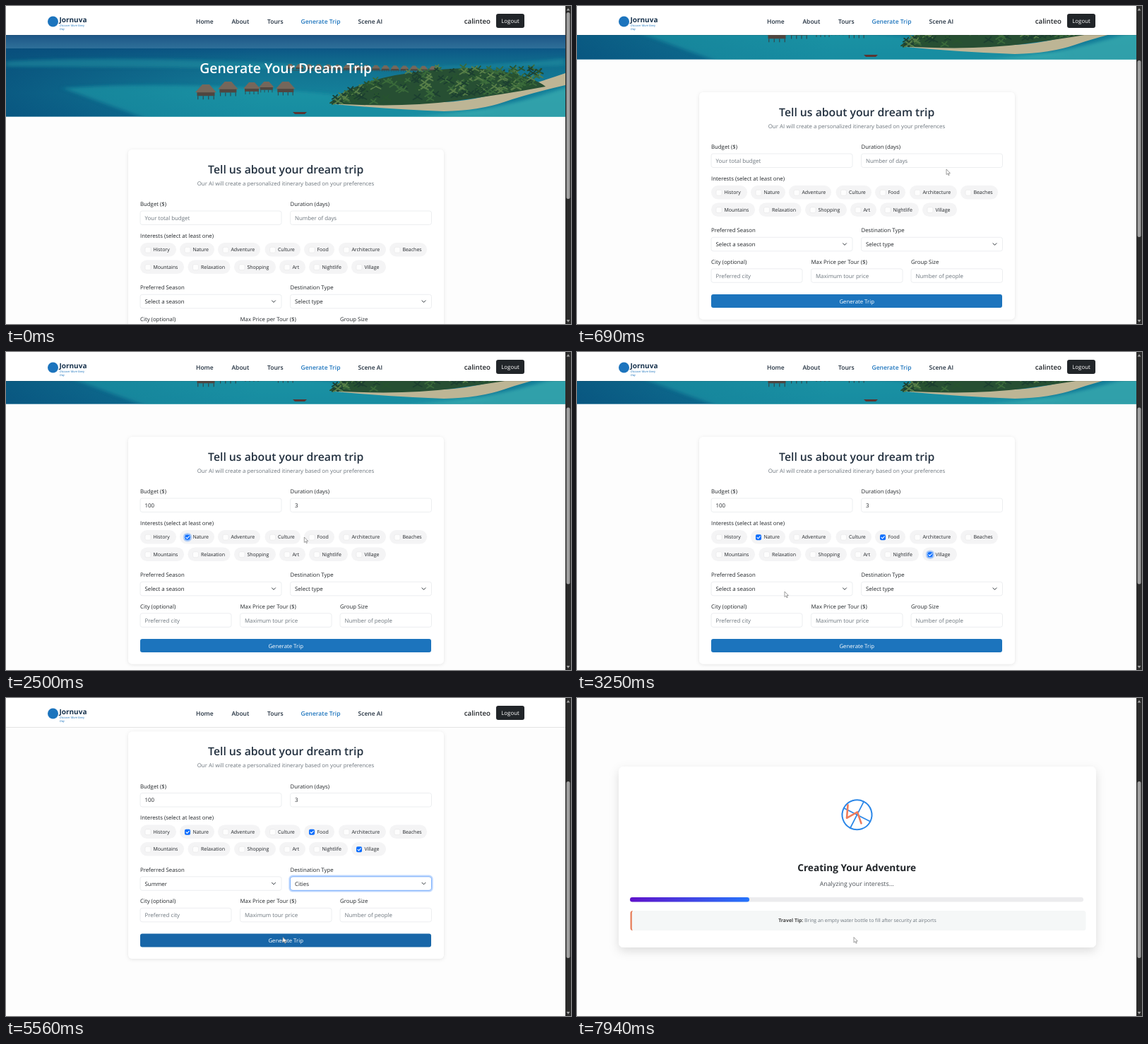
An HTML page for the animation above (8 s loop, 800 by 450 pixels).

```html
<!DOCTYPE html>
<html lang="en">
<head>
<meta charset="utf-8">
<title>Trip generator</title>
<style>
  html, body { margin: 0; width: 100%; height: 100%; overflow: hidden; background: #fdfdfd; }
  svg { display: block; width: 100vw; height: 100vh; }
  text { font-family: "Open Sans", "Noto Sans", sans-serif; text-rendering: geometricPrecision; white-space: pre; }
  .field { fill: #fff; stroke: #e7eaed; stroke-width: .8; }
  .line { fill: none; stroke-linecap: round; stroke-linejoin: round; }
</style>
</head>
<body>
<svg id="stage" viewBox="0 0 800 450">
  <defs>
    <linearGradient id="sky" x2="0" y2="1"><stop stop-color="#1d5686"/><stop offset="1" stop-color="#2f719a"/></linearGradient>
    <linearGradient id="sea" x2="0" y2="1">
      <stop stop-color="#0c5786"/><stop offset=".25" stop-color="#12708f"/>
      <stop offset=".65" stop-color="#14809a"/><stop offset="1" stop-color="#0f7495"/>
    </linearGradient>
    <linearGradient id="deep"><stop stop-color="#064a78" stop-opacity=".7"/><stop offset="1" stop-color="#064a78" stop-opacity="0"/></linearGradient>
    <linearGradient id="bar"><stop stop-color="#5f12cb"/><stop offset="1" stop-color="#2575fc"/></linearGradient>
    <filter id="blur"><feGaussianBlur stdDeviation="4 2"/></filter>
    <filter id="soft" x="-10%" y="-10%" width="120%" height="125%"><feDropShadow dx="0" dy="1" stdDeviation="2.5" flood-opacity=".1"/></filter>
    <filter id="lift" x="-10%" y="-10%" width="120%" height="130%"><feDropShadow dx="0" dy="5" stdDeviation="7" flood-opacity=".13"/></filter>
    <clipPath id="frame"><rect y="41" width="792" height="115.500"/></clipPath>
  </defs>
  <rect width="800" height="450" fill="#fdfdfd"/>
  <g id="site">
    <g id="page"></g>
    <g id="header"></g>
  </g>
  <g id="loading"></g>
  <g id="scrollbar">
    <rect x="792" width="8" height="450" fill="#2b2b2b"/>
    <path d="M796 3l2.4 3.4h-4.8zM796 447.500l2.400-3.400h-4.800z" fill="#a3a3a3"/>
    <rect id="thumb" x="793.500" width="5" rx="2.500" fill="#a0a0a0"/>
  </g>
  <path id="arrow" d="M0 0V7.600L1.800 6 3 8.700 4.200 8.200 3 5.600H5.400Z" fill="#fff" stroke="#777" stroke-width=".7"/>
  <path id="beam" class="line" d="M-1.500-4.500h3M0-4.500v9M-1.500 4.500h3" stroke="#333" stroke-width=".8"/>
</svg>
<script>
const LOOP = 8000;
const $ = id => document.getElementById(id);
const show = (id, on) => $(id).setAttribute("visibility", on ? "visible" : "hidden");
const move = (id, x, y) => $(id).setAttribute("transform", `translate(${x} ${y})`);
const INK = "#212529", NAVY = "#22303f", GREY = "#6c757d";

const label = (x, y, str, size, fill = INK, more = "") =>
  `<text x="${x}" y="${y}" font-size="${size}" fill="${fill}" ${more}>${str}</text>`;
const box = (x, y, w, h, r, fill, more = "") =>
  `<rect x="${x}" y="${y}" width="${w}" height="${h}" rx="${r}" fill="${fill}" ${more}/>`;
const MID = 'text-anchor="middle"', SEMI = 'font-weight="600"';

function hut(x, y, s) {
  return `<g transform="translate(${x} ${y}) scale(${s})">
    <path d="M2 8h20v5H2z" fill="#4f4640"/><path d="M0 9 8 0h8l8 9z" fill="#75675b"/>
    <path d="M3 13v4M9 13v4M15 13v4M21 13v4" stroke="#33484f"/></g>`;
}

// Palm crowns: short random fronds over the outline of the island.
function palms(count) {
  let seed = 7;
  const rnd = () => (seed = seed * 16807 % 2147483647) / 2147483647;
  return Array.from({ length: count }, () => {
    const u = rnd(), x = 466 + u * 290;
    const top = 128 - 44 * Math.sin(Math.PI * Math.min(.62, u * .95)), low = 137 - 24 * u * u;
    const y = top + rnd() * (low - top), r = 3 + rnd() * 4;
    return `<path d="M${x} ${y}l${-r} ${r * .6}M${x} ${y}l${r} ${r * .5}M${x} ${y}l${-r * .7} ${-r * .5}M${x} ${y}l${r * .6} ${-r * .7}"
      stroke="${["#1c3f30", "#27532f", "#3a6a3a", "#587f48"][Math.floor(rnd() * 4)]}" stroke-width="1.800"/>`;
  }).join("");
}

function hero() {
  const farHuts = Array.from({ length: 16 }, (_, i) => hut(396 + i * 13.500, 82 + i * .2, .52)).join("");
  return `<g clip-path="url(#frame)">${box(0, 41, 792, 20, 0, "url(#sky)")}${box(0, 60, 792, 97, 0, "url(#sea)")}
    ${box(0, 60, 360, 97, 0, "url(#deep)")}
    <g filter="url(#blur)">
      <path d="M0 78Q180 70 400 82T792 74V84Q560 92 380 89T0 86z" fill="#2396a6" opacity=".5"/>
      <path d="M80 116Q260 104 470 126T700 150L600 160H200z" fill="#20a0ab" opacity=".55"/>
      <path d="M560 158Q700 150 800 112V160z" fill="#37aab0" opacity=".8"/>
    </g>
    <path d="M395 91H620" stroke="#3f5358" stroke-width="1.200"/>${farHuts}
    <path d="M466 137Q560 138 620 136T792 95V112Q740 124 705 136T620 149Q540 146 466 139z" fill="#bdb595"/>
    <path d="M458 137Q480 118 515 107T595 92Q660 84 705 93T764 114Q700 126 630 135T458 138z" fill="#274f33"/>
    <g class="line">${palms(170)}</g>
    ${hut(268, 111, 1.250)}${hut(300, 107, 1.200)}${hut(336, 108, 1)}${hut(358, 107, .9)}${hut(382, 107, 1.150)}
    <path d="M406 150h20l-3 3h-14z" fill="#5a3532"/></g>
    ${label(396.2, 94.5, "Generate Your Dream Trip", 19.4, "#fff", MID + SEMI)}`;
}

const chips = [
  ["History", 190, 51, 0], ["Nature", 246, 49, 0, 2250], ["Adventure", 300, 60, 0], ["Culture", 366.5, 50.500, 0],
  ["Food", 422, 43, 0, 2600], ["Architecture", 471, 67, 0], ["Beaches", 543, 53, 0],
  ["Mountains", 190, 62, 1], ["Relaxation", 257.5, 60, 1], ["Shopping", 323, 59, 1], ["Art", 387, 37, 1],
  ["Nightlife", 429, 55, 1], ["Village", 489, 49, 1, 2950]
];
const chip = ([name, x, w, row, at]) => {
  const y = 335 + row * 24.5;
  const tick = at ? `<g id="${name}">${box(x + 7, y + 6.2, 8, 8, 2, "#0d6efd")}
    <path class="line" d="M${x + 9} ${y + 10.3}l1.500 1.500 2.800-3" stroke="#fff" stroke-width="1.100"/></g>` : "";
  return box(x, y, w, 19.500, 9.75, "#f4f4f5") +
    box(x + 7, y + 6.2, 8, 8, 2, "#fdfdfd", 'stroke="#e8e8ea" stroke-width=".7"') + tick +
    label(x + 18.4, y + 12.2, name, 7);
};

// A labelled input; the text element carries the id so that its value can change.
const field = (id, name, x, y, w, hint, select) =>
  label(x, y - 7, name, 7.8) + `<rect class="field" x="${x}" y="${y}" width="${w}" height="19.500" rx="3"/>` +
  label(x + 6.5, y + 12.9, hint, 7.9, select ? INK : GREY, `id="${id}"`) +
  (select ? `<path class="line" d="M${x + w - 13.500} ${y + 8.500}l2.500 2.600 2.500-2.600" stroke="#343a40"/>` : "");

$("page").innerHTML = hero() +
  box(173, 203, 447, 321.5, 6, "#fff", 'filter="url(#soft)"') +
  label(396.2, 236.600, "Tell us about your dream trip", 15.75, NAVY, MID + SEMI) +
  label(396, 253.8, "Our AI will create a personalized itinerary based on your preferences", 7.86, GREY, MID) +
  field("budget", "Budget ($)", 190, 290, 200, "Your total budget") +
  field("days", "Duration (days)", 402.5, 290, 200, "Number of days") +
  label(190, 327.5, "Interests (select at least one)", 7.85) + chips.map(chip).join("") +
  field("season", "Preferred Season", 190, 408.3, 200, "Select a season", true) +
  field("kind", "Destination Type", 402.5, 408.3, 200, "Select type", true) +
  field("city", "City (optional)", 190, 452.8, 129, "Preferred city") +
  field("price", "Max Price per Tour ($)", 331.5, 452.8, 129.5, "Maximum tour price") +
  field("group", "Group Size", 473, 452.8, 129.5, "Number of people") +
  box(190, 489, 412, 19, 3, "#1c74bd", 'id="submit"') +
  label(396.2, 501.5, "Generate Trip", 7.8, "#fff", MID) +
  `<rect id="ring" rx="3.500" fill="none" stroke="#86b7fe" stroke-width="1"/>
   <rect id="glow" rx="4.500" fill="none" stroke="#0d6efd" stroke-opacity=".25" stroke-width="2"/>
   <path id="spin" d="M589.200 298.500l2-2.600 2 2.600zM589.200 301.700l2 2.600 2-2.600z" fill="#777"/>
   <rect id="caret" y="295.500" width=".7" height="9" fill="#111"/>`;

const nav = [["Home", 269], ["About", 319.5], ["Tours", 370], ["Generate Trip", 417.5], ["Scene AI", 498.5]];
$("header").innerHTML = box(0, 41, 792, 1, 0, "#000", 'opacity=".1"') + box(0, 0, 792, 41, 0, "#fff") +
  `<circle cx="66.500" cy="22" r="7.500" fill="#1c74bd"/>` +
  label(75.5, 23, "Jornuva", 10, "#17324d", 'font-weight="700"') +
  label(76, 28.8, "Discover More Every", 4, "#1c74bd", 'font-style="italic"') +
  label(76, 33.6, "Day", 4, "#1c74bd", 'font-style="italic"') +
  nav.map(([name, x]) => label(x, 24.6, name, 8.5, name === "Generate Trip" ? "#1c74bd" : NAVY, SEMI)).join("") +
  label(686, 25, "calinteo", 9.7, INK, SEMI + 'text-anchor="end"') +
  box(694, 11, 40, 20, 3, INK) + label(714, 24.2, "Logout", 7.9, "#fff", MID);

$("loading").innerHTML = box(59, 97, 676, 256, 7, "#fff", 'filter="url(#lift)"') +
  `<g transform="translate(396.500 165.300)"><g id="globe" class="line" stroke="#2b87e8" stroke-width="2">
     <circle r="21"/><path d="M-21 0H21M0-21V21" stroke-width="1.700"/>
     <path id="route" d="M-13-14-14.500 4.500.5-4 6 12" transform="rotate(-207)" stroke="#ee7c5c" stroke-width="2.600"
       pathLength="1" stroke-dasharray="1 2"/></g></g>` +
  label(396.2, 244.6, "Creating Your Adventure", 13.65, INK, MID + 'font-weight="700"') +
  label(396.2, 266.2, "", 8.8, "#4b5157", MID + 'id="status"') +
  box(75, 282, 642, 6.500, 3.250, "#ececee") + box(75, 282, 0, 6.500, 3.250, "url(#bar)", 'id="progress"') +
  box(75.5, 301, 645, 28, 3.5, "#f5f7f7") +
  `<path d="M79 301q-3.500 0-3.500 3.500v21q0 3.500 3.500 3.500-1.200-1-1.200-3.500v-21q0-2.500 1.200-3.500z" fill="#e8805c"/>
   <text x="397" y="317.400" font-size="6.900" fill="#6c757d" text-anchor="middle"><tspan font-weight="700" fill="#444">Travel Tip:</tspan> <tspan id="tip"></tspan></text>`;

const smooth = u => u * u * (3 - 2 * u);
const linear = u => u;
// Eased value between [time, value...] keys.
function track(keys, t, ease = smooth) {
  const i = keys.findIndex(k => k[0] > t);
  if (i < 0) return keys[keys.length - 1].slice(1);
  if (i === 0) return keys[0].slice(1);
  const [a, b] = [keys[i - 1], keys[i]], u = ease((t - a[0]) / (b[0] - a[0]));
  return a.slice(1).map((v, j) => v + (b[j + 1] - v) * u);
}
const latest = (keys, t) => keys.reduce((v, k) => t >= k[0] ? k[1] : v, null);

const scroll = [[120, 0, 9, 264], [600, 81, 77, 250], [750, 81, 77, 250], [880, 83, 78.5, 250], [4150, 83, 78.5, 250],
  [4300, 85.5, 80, 250], [4450, 85.5, 80, 250], [4800, 155.5, 118, 250]];
const pointer = [[300, 524, 231], [700, 523, 231], [1000, 262, 216], [1400, 262, 216], [1620, 414.5, 212.5],
  [1950, 414.5, 212.5], [2200, 257, 262], [2280, 257, 262], [2540, 433, 262], [2640, 433, 262], [2880, 500, 287],
  [2980, 500, 287], [3250, 294, 339], [3450, 280, 336], [3700, 222, 364], [3950, 470, 334], [4150, 428, 360],
  [4380, 328, 324], [4850, 392, 338.5]];
const values = {
  budget: [[0, "Your total budget"], [1200, "1"], [1300, "10"], [1390, "100"]],
  days: [[0, "Number of days"], [1740, "3"]],
  season: [[0, "Select a season"], [3720, "Summer"]],
  kind: [[0, "Select type"], [4170, "Cities"]],
  status: [[0, "Planning your perfect trip..."], [7350, "Analyzing your interests..."]],
  tip: [[0, "Pack a portable charger for your devices"], [7350, "Bring an empty water bottle to fill after security at airports"]]
};
const focus = [[1020, [190, 290, 200, 19.5]], [1640, [402.5, 290, 200, 19.5]], [2250, [253, 341.2, 8, 8]],
  [2600, [429, 341.2, 8, 8]], [2950, [496, 365.7, 8, 8]], [3470, [190, 408.3, 200, 19.5]], [3980, [402.5, 408.3, 200, 19.5]]];
const progress = [[5855, 0], [6560, 93.7], [7940, 169]];

function setRect(id, [x, y, w, h], grow) {
  Object.entries({ x: x - grow, y: y - grow, width: w + 2 * grow, height: h + 2 * grow })
    .forEach(([k, v]) => $(id).setAttribute(k, v));
}

function draw(t) {
  const busy = t >= 5855;
  $("site").style.display = busy ? "none" : "";
  $("loading").style.display = busy ? "" : "none";

  const [top, thumbY, thumbH] = track(scroll, t, u => 1 - (1 - u) ** 2);
  move("page", 0, -top);
  $("thumb").setAttribute("y", thumbY);
  $("thumb").setAttribute("height", thumbH);

  for (const id in values) {
    const text = latest(values[id], t);
    if ($(id).textContent !== text) $(id).textContent = text;
  }
  ["budget", "days"].forEach(id => $(id).setAttribute("fill", t >= values[id][1][0] ? INK : GREY));
  chips.filter(c => c[4]).forEach(c => $(c[0]).style.display = t >= c[4] ? "" : "none");

  const target = latest(focus, t);
  const inDays = t >= 1640 && t < 2250, typing = t >= 1020 && t < 2250;
  ["ring", "glow"].forEach(id => $(id).style.display = target ? "" : "none");
  if (target) { setRect("ring", target, 0); setRect("glow", target, 1.2); }
  $("spin").style.display = inDays ? "" : "none";
  $("caret").style.display = typing ? "" : "none";
  const typed = inDays ? t >= 1740 : Math.max(0, Math.min(3, Math.floor((t - 1110) / 90)));
  $("caret").setAttribute("x", (inDays ? 409 : 196.5) + typed * 4.6);
  $("submit").setAttribute("fill", t > 4750 ? "#1866a8" : "#1c74bd");

  const [px, py] = track(pointer, t), overText = (t > 940 && t < 1460) || (t > 1590 && t < 2000);
  show("arrow", t >= 300 && !overText);
  show("beam", overText);
  move("arrow", px, py);
  move("beam", px, py);

  $("progress").setAttribute("width", track(progress, t, linear)[0]);
  $("globe").setAttribute("transform", `rotate(${70 + (t - 6560) * 137 / 1380})`);
  const drawn = Math.max(0, Math.min(1, (t - 6700) / 1200));
  $("route").style.display = drawn ? "" : "none";
  $("route").setAttribute("stroke-dashoffset", 1 - drawn);
}

const start = performance.now();
function tick(now) {
  draw(Math.max(0, now - start) % LOOP);
  requestAnimationFrame(tick);
}
draw(0);
requestAnimationFrame(tick);
</script>
</body>
</html>
```
